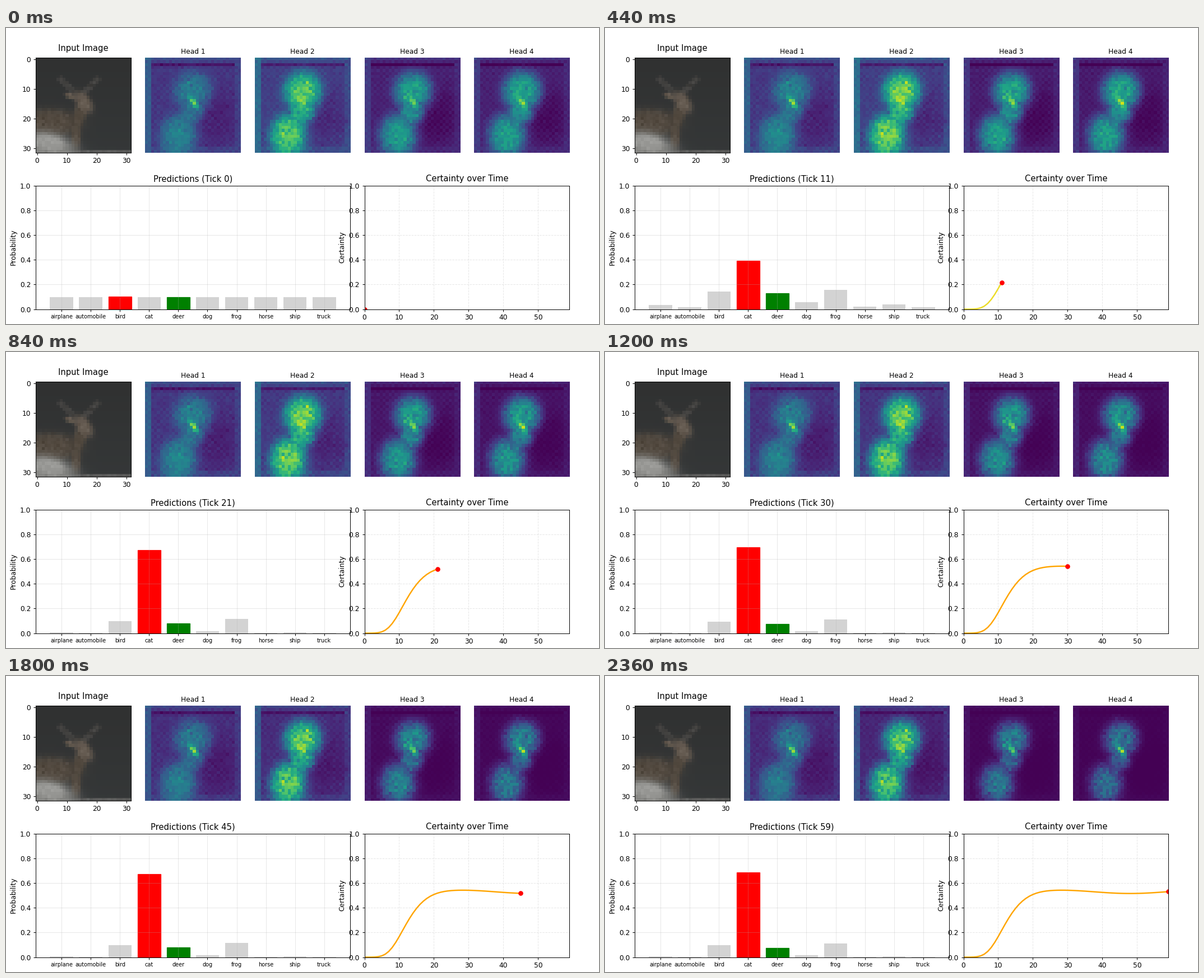
A matplotlib script that plays this animation: 1058 by 529 pixels, repeating every 2.4 s.

```python
import numpy as np
import matplotlib.pyplot as plt
from matplotlib.animation import FuncAnimation

TICKS = 60
N = 32
X, Y = np.meshgrid(np.arange(N), np.arange(N))
CLASSES = ["airplane", "automobile", "bird", "cat", "deer",
           "dog", "frog", "horse", "ship", "truck"]
BIRD, DEER = 2, 4
FINAL = np.array([.006, .001, .096, .683, .076, .016, .112, .002, .007, .001])


# ---- class probabilities and certainty ----
def confidence(t):
    """Logit scale: smooth rise to 1, then a slight slow ripple."""
    rise = 1 - np.exp(-(t / 12.6) ** 2.37)
    return rise + .025 * rise ** 2 * np.cos(2 * np.pi * (t - 27) / 42)


def probs(t):
    logits = confidence(t) * np.log(FINAL)
    logits[BIRD] += .03 * np.exp(-t / 2)
    p = np.exp(logits)
    return p / p.sum()


def certainty(t):
    """One minus normalised entropy."""
    p = probs(t)
    return 1 + (p * np.log(p)).sum() / np.log(len(p))


# ---- soft shapes on a coarse grid ----
def radius(cx, cy, rx, ry, tilt=0):
    c, s = np.cos(tilt), np.sin(tilt)
    dx, dy = X - cx, Y - cy
    return np.hypot((c * dx + s * dy) / rx, (c * dy - s * dx) / ry)


def lobe(*shape):
    return np.exp(-.7 * radius(*shape) ** 3.5)


def picture():
    rng = np.random.default_rng(3)
    img = np.ones((N, N, 3)) * (48, 49, 49) + Y[..., None] * (.15, .2, .22)

    def paint(color, *shape):
        r = radius(*shape)
        a = 1 / (1 + np.exp(np.clip(7 * (r - 1), -30, 30)))[..., None]
        grain = rng.normal(0, 4, (N, N, 1))
        img[:] = img * (1 - a) + (np.array(color) + grain) * a

    for side in (-1, 1):
        for s in np.linspace(0, 1, 5):
            paint((68, 67, 65), 14 + side * (2 + 4 * s), 11 - 4 * s, 1, 1)
    brown, tan, rock = (82, 73, 63), (98, 88, 78), (134, 134, 131)
    paint(brown, 4, 21.5, 10, 4.5)
    paint(brown, 14.5, 18, 2, 5, .25)
    paint(brown, 13, 26, 1.6, 4)
    paint(tan, 15.5, 14.5, 4, 2.2, .9)
    paint(tan, 11, 12.5, 1.8, .9, .4)
    paint((92, 92, 91), 23, 31.5, 12, 1)
    paint(rock, 3, 30, 10, 5.5, .15)
    paint((152, 152, 149), 4, 28, 5, 2.5, .2)
    return np.clip(img, 0, 255).astype(np.uint8)


# ---- attention maps ----
def base_map(seed, back, head, body, hot):
    """Two joined lobes with a hot diagonal, on a faintly checkered ground."""
    rng = np.random.default_rng(seed)
    neck = .45 * (head + body)
    v = np.full((N, N), back)
    for weight, shape in ((head, (15.6, 11, 5.8, 6)), (neck, (15.3, 17.5, 3.8, 5, .5)),
                          (body, (10.6, 25.5, 5.6, 6.5, .15))):
        v = np.maximum(v, back + (weight - back) * lobe(*shape))
    v *= 1 + rng.normal(0, .08, (N, N))
    v += hot * np.exp(-radius(15.8, 14.8, .8, 2, -.6) ** 2)
    v -= .07 * lobe(23, 19, 7, 9)
    rim = np.minimum(np.minimum(X, N - 1 - X), np.minimum(Y, N - 1 - Y))
    v += .3 * back * (rim < 2) + .6 * back * (X < 2)
    v += .015 * (-1.0) ** (X + Y) + .03 * np.cos(np.pi * Y) * np.exp(-Y / 3)
    v[2, 2:30] -= .13
    return np.clip(v, 0, 1)


# background, head, body, hot spot, sharpening over the loop
HEADS = [(.17, .46, .48, .52, .2), (.2, .8, .8, .2, .4),
         (.1, .62, .58, .38, .8), (.1, .64, .6, .38, 1.05)]
BASES = [base_map(k, *spec[:-1]) for k, spec in enumerate(HEADS)]


def head_map(k, t):
    gain = .92 + .08 * min(t / 6, 1)
    return gain * BASES[k] ** (1 + HEADS[k][-1] * (t / (TICKS - 1)) ** 1.2)


# ---- layout ----
fig = plt.figure(figsize=(12, 6), dpi=88.16667, facecolor="white")
gs = fig.add_gridspec(2, 5, height_ratios=[1, 1.3], left=.05, right=.95,
                      top=.9, bottom=.05, hspace=.3, wspace=.15)

ax_in = fig.add_subplot(gs[0, 0])
ax_in.imshow(picture(), interpolation="nearest")
ax_in.set_title("Input Image", pad=10)
ax_in.set_xticks(range(0, N, 10))
ax_in.set_yticks(range(0, N, 10))

maps = []
for k in range(len(HEADS)):
    ax = fig.add_subplot(gs[0, k + 1])
    maps.append(ax.imshow(head_map(k, 0), cmap="viridis", vmin=0, vmax=1,
                          interpolation="nearest"))
    ax.set_title(f"Head {k + 1}", fontsize=10)
    ax.axis("off")

ax_bar = fig.add_subplot(gs[1, :3])
bars = ax_bar.bar(CLASSES, probs(0))
ax_bar.set_ylim(0, 1)
ax_bar.set_ylabel("Probability")
ax_bar.tick_params(axis="x", labelsize=8)
ax_bar.grid(alpha=.3)
title = ax_bar.set_title("Predictions (Tick 0)")

ax_cert = fig.add_subplot(gs[1, 3:])
line, = ax_cert.plot([], [], lw=2)
dot, = ax_cert.plot([], [], "ro")
ax_cert.set_xlim(0, TICKS - 1)
ax_cert.set_ylim(0, 1)
ax_cert.set_title("Certainty over Time")
ax_cert.set_ylabel("Certainty")
ax_cert.set_xlabel("tick", x=.27)
ax_cert.grid(ls="--", alpha=.3)

curve = np.array([certainty(t) for t in range(TICKS)])


def update(t):
    for k, im in enumerate(maps):
        im.set_data(head_map(k, t))
    p = probs(t)
    for i, (bar, h) in enumerate(zip(bars, p)):
        color = "green" if i == DEER else "red" if i == p.argmax() else "lightgray"
        bar.set_height(h)
        bar.set_facecolor(color)
        bar.set_edgecolor("none" if color == "lightgray" else color)
    title.set_text(f"Predictions (Tick {t})")
    line.set_data(np.arange(t + 1), curve[:t + 1])
    line.set_color("orange" if curve[t] > .5 else "#ecdc28")
    dot.set_data([t], [curve[t]])
    return [*maps, *bars, title, line, dot]


anim = FuncAnimation(fig, update, frames=TICKS, interval=40, repeat=True,
                     repeat_delay=0, blit=False)
plt.show()
```
